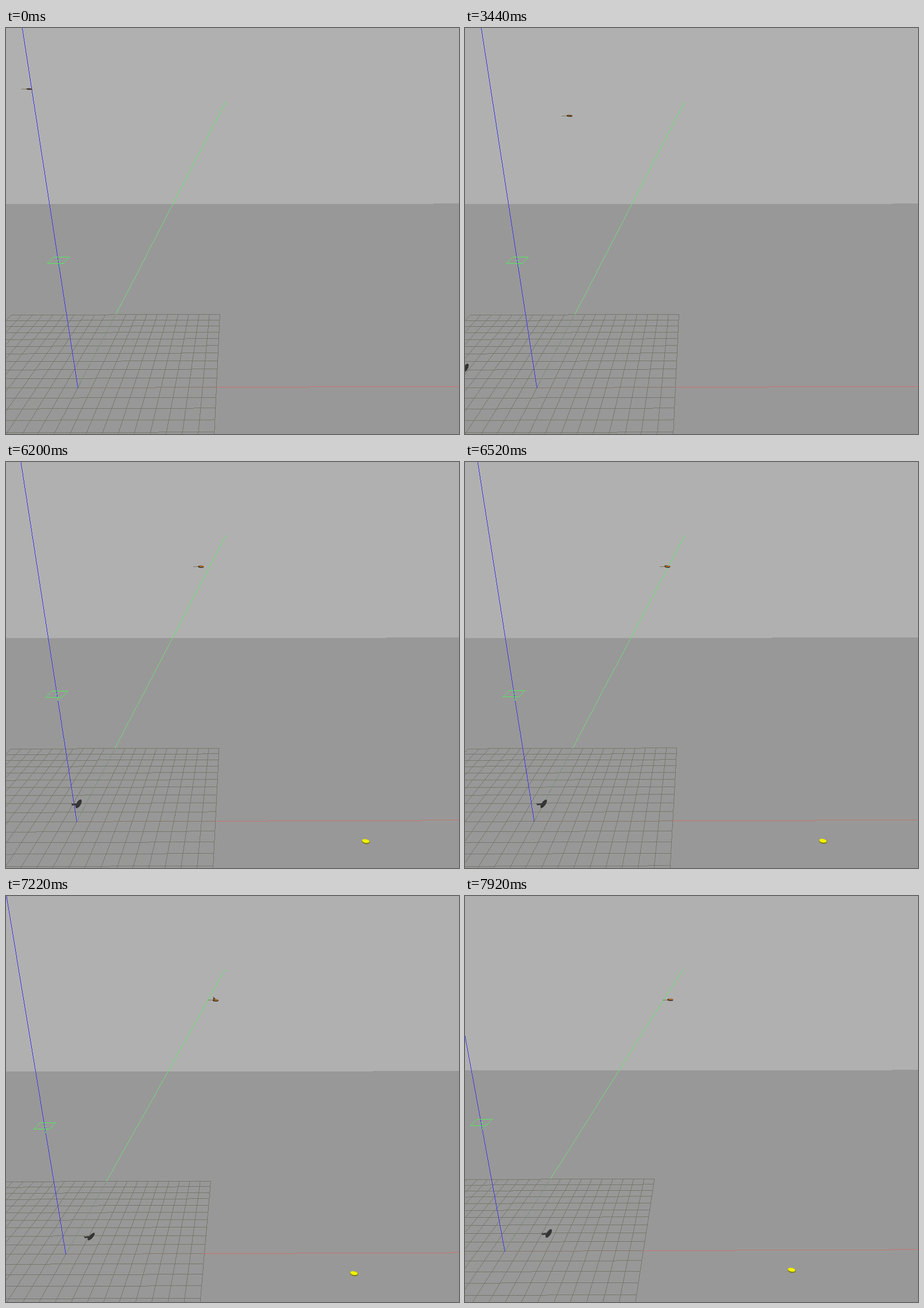
These frames come from a looping animation (791x708 px, 8 s). An HTML page with a canvas:

```html
<!DOCTYPE html>
<html lang="en">
<head>
<meta charset="utf-8">
<title>Flight over a grid</title>
<style>
html, body { margin: 0; width: 100%; height: 100%; overflow: hidden; background: #999; }
canvas { display: block; width: 791px; height: 708px; }
</style>
</head>
<body>
<canvas id="stage" width="791" height="708"></canvas>
<script>
const ctx = document.getElementById('stage').getContext('2d');
const W = 791, H = 708, LOOP = 8000;
const BURST = 840, MOVING = 740, FIRST = 500, LAST = 7920;
const CAMERA_START = 6200;
const GRID = 10, DEPTH = 30.3;

// Distance flown at a few times.
const flight = [[500, 45], [2180, 125], [3440, 187], [5240, 297], [6940, 386], [7600, 413], [7920, 435]];

const lerp = (a, b, k) => a + (b - a) * k;
const clamp = k => Math.min(1, Math.max(0, k));
const smooth = k => k * k * (3 - 2 * k);

// Motion comes in bursts with a short rest after each.
function burstTime(t) {
  if (t < FIRST) return FIRST;
  const phase = (t - FIRST) % BURST;
  return Math.min(LAST, t - phase + Math.min(phase, MOVING));
}

function distance(t) {
  const i = Math.max(1, flight.findIndex(([time]) => t <= time));
  const [t0, d0] = flight[i - 1], [t1, d1] = flight[i];
  return lerp(d0, d1, (t - t0) / (t1 - t0));
}

// Hard-edged line, one pixel wide.
function line(color, [x0, y0], [x1, y1]) {
  const n = Math.ceil(Math.max(Math.abs(x1 - x0), Math.abs(y1 - y0)));
  ctx.fillStyle = color;
  for (let i = 0; i <= n; i++) {
    ctx.fillRect(Math.round(lerp(x0, x1, i / n)), Math.round(lerp(y0, y1, i / n)), 1, 1);
  }
}

function fill(color, points) {
  ctx.beginPath();
  points.forEach(([x, y]) => ctx.lineTo(x, y));
  ctx.fillStyle = color;
  ctx.fill();
}

function oval(color, x, y, rx, ry, turn = 0) {
  ctx.beginPath();
  ctx.ellipse(x, y, rx, ry, turn, 0, 7);
  ctx.fillStyle = color;
  ctx.fill();
}

function drawGround(cam) {
  ctx.fillStyle = '#b0b0b0';
  ctx.fillRect(0, 0, W, H);
  ctx.fillStyle = '#989898';
  const left = 307.4 - 3 * cam;
  for (let x = 0; x < W; x++) {
    const y = Math.round(left - .955 * x / W);
    ctx.fillRect(x, y, 1, H - y);
  }
}

function drawAxes(cam) {
  const ox = lerp(125, 69, cam), oy = lerp(627, 619, cam);
  const vx = lerp(391, 389, cam), vy = 113;
  const project = (x, y) => {
    const k = DEPTH / (DEPTH + y);
    return [vx + (ox - vx + x * 24.2) * k, vy + (oy - vy - x * .09) * k];
  };
  const origin = project(0, 0);

  for (let i = -GRID; i <= GRID; i++) {
    line('#77776c', project(i, -GRID), project(i, GRID));
    line('#77776c', project(-GRID, i), project(GRID, i));
  }

  line('#7b907b', origin, project(0, GRID));
  line('#74d97b', project(0, GRID), project(0, 50));
  line('#5ee765', project(0, 50), project(0, 1000));
  line('#867669', origin, project(GRID, 0));
  line('#c4756d', project(GRID, 0), project(3 * GRID, 0));
  line('#3c36ea', origin, [lerp(28, -45.5, cam), 0]);
}

function drawMarker(cam) {
  const x = lerp(90.5, 27.5, cam), y = lerp(404.5, 394.5, cam);
  const corners = [[-8, -5.5], [19, -5.5], [9, 5.5], [-19, 5.5]].map(([dx, dy]) => [x + dx, y + dy]);
  corners.forEach((p, i) => line('#55e95c', p, corners[(i + 1) % 4]));
  line('#55e95c', [x - 2, y], [x + 3, y]);
  line('#55e95c', [x + 2, y + 5], [x + 2, y + 11]);
}

function drawBird(flown, cam, lift) {
  const x = flown - 72 * cam;
  const y = 106 + 76 * smooth(clamp((flown - 62) / 217)) - 1.5 * cam;
  line('#85775a', [x - 18, y], [x - 9, y]);
  ctx.save();
  ctx.translate(x + .5, y + .5);
  fill('#5a4224', [[-9, 0], [-3, 0], [-9, -9 * lift]]);
  oval('#2b2118', -5, 0, 5, lerp(1, 2, clamp(flown / 350)), .05);
  ctx.globalAlpha = clamp(flown / 350);
  oval('#b87624', -4.5, -.5, 4, 1.2, .05);
  ctx.restore();
}

function drawDarkBird(flown, cam, lift) {
  const ahead = flown - 187;
  ctx.save();
  ctx.translate(-12 + .795 * ahead - 52 * cam, 593 + .022 * ahead - 10 * cam);
  const dark = '#343434';
  fill(dark, [[0, -1], [3, 0], [8, -1], [10, 3], [5, 2], [2, 3]]);
  oval(dark, 13, 0, 8.6, 3.8 - lift, -1.03 + lift * .25);
  ctx.restore();
}

function drawBall(cam) {
  const x = 630.5 - 60 * cam, y = 661.7 - 9.4 * cam;
  oval('#77770c', x, y + .5, 7, 4.2, .17);
  oval('#f2f200', x - .3, y - .5, 6.5, 3.3, .17);
}

function frame(now) {
  const t = burstTime(now % LOOP);
  const flown = distance(t);
  const turning = t >= CAMERA_START;
  const cam = turning ? .03 + .97 * ((flown - 342) / 93) ** 2 : 0;
  const lift = Math.sin(Math.PI * (flown / 20.3 - .2)) ** 4;
  drawGround(cam);
  drawAxes(cam);
  drawMarker(cam);
  drawBird(flown, cam, lift);
  drawDarkBird(flown, cam, lift);
  if (turning) drawBall(cam);
}

const start = performance.now();
(function tick() {
  frame(performance.now() - start);
  requestAnimationFrame(tick);
})();
</script>
</body>
</html>
```
